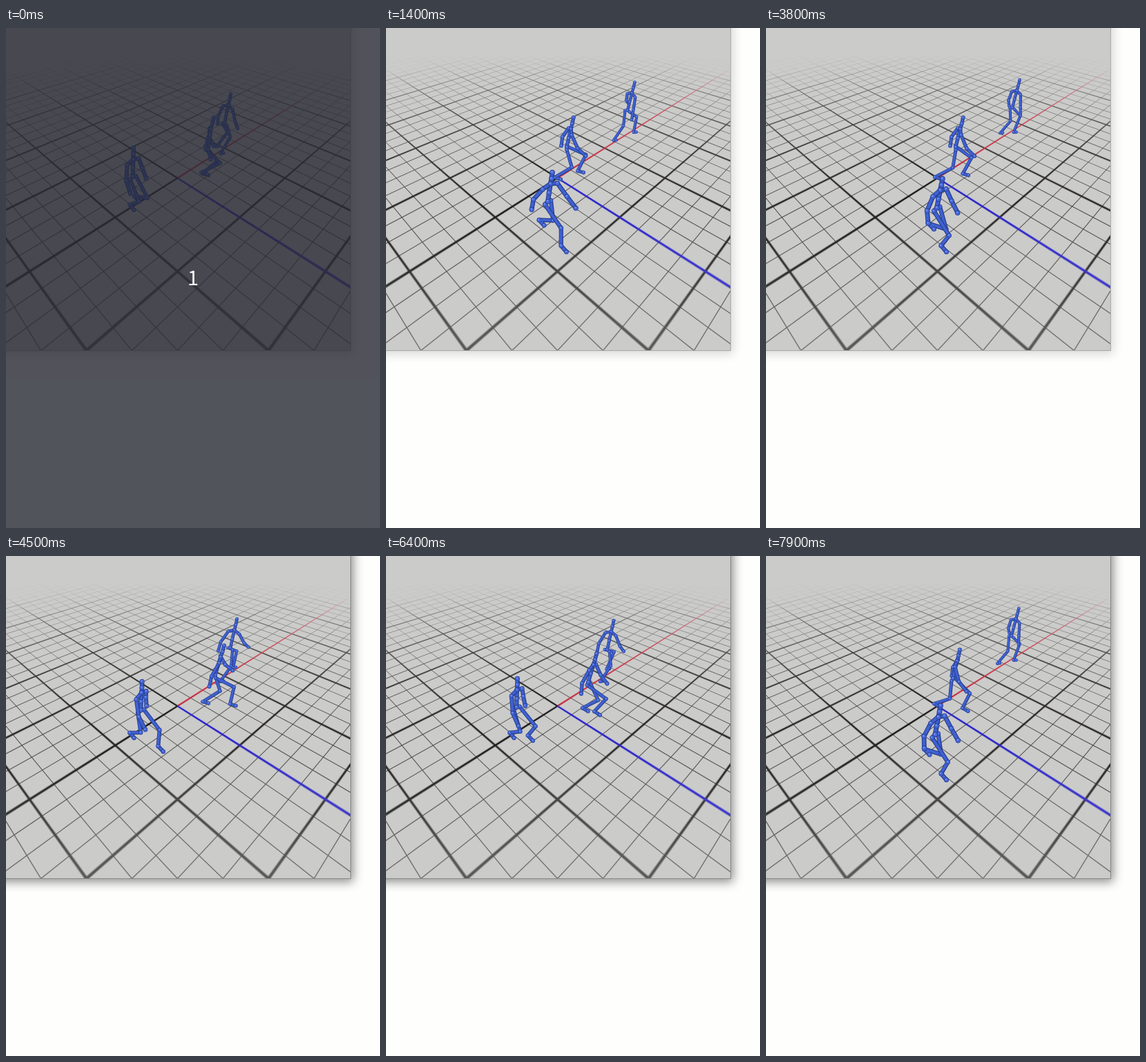
An HTML page with a canvas for the animation above (8 s loop, 542x723 px).

```html
<!DOCTYPE html>
<html lang="en">
<head>
<meta charset="utf-8">
<title>Walking skeletons</title>
<style>
  html, body { margin: 0; width: 100%; height: 100%; overflow: hidden; background: #fefefc; }
  #panel {
    position: absolute; left: -40px; top: -40px; box-sizing: border-box;
    width: 540px; height: 507px; border: 1px solid;
  }
  canvas { position: absolute; left: 39px; top: 39px; }
  #cover {
    position: absolute; inset: 0; display: grid; place-items: center;
    padding-bottom: 5px; background: rgba(39, 41, 51, .8); color: #fff;
    font: 29px/1 "Noto Sans CJK JP", "Noto Sans CJK SC", "DejaVu Sans", sans-serif;
  }
</style>
</head>
<body>
<div id="panel"><canvas id="view" width="499" height="466"></canvas></div>
<div id="cover">1</div>
<script>
const panel = document.getElementById('panel');
const view = document.getElementById('view');
const cover = document.getElementById('cover');
const ctx = view.getContext('2d');
const W = view.width, H = view.height, LOOP = 8000, TICK = 100;
const clamp = v => Math.max(0, Math.min(1, v));
const mix = (a, b, u) => a + (b - a) * u;

// r runs sideways, f towards the viewer, h up; one unit per heavy floor cell.
const CAM = { x: 248.5, y: 217, focal: 432, dist: 2.774, sin: .63, cos: .758 };
function project(r, f, h = 0) {
  const z = CAM.dist - f * CAM.cos - h * CAM.sin, scale = CAM.focal / z;
  return { x: CAM.x + r * scale, y: CAM.y + (f * CAM.sin - h * CAM.cos) * scale, z, scale };
}

const FAR = -4.3, NEAR = 3;
const HEAVY = { k: 9.85, c: 1.2 }, LIGHT = { k: 2.4, c: 0 };

// A floor line r = n + s * f, tapered with depth.
function floorLine(g, n, s, f0, f1, color, { k, c }, grow = 1) {
  const a = project(n + s * f0, f0), b = project(n + s * f1, f1);
  const len = Math.hypot(b.x - a.x, b.y - a.y);
  const nx = (a.y - b.y) / len, ny = (b.x - a.x) / len;
  const half = z => Math.max(.2, k / z - c) * grow / 2;
  const wa = half(a.z), wb = half(b.z);
  g.fillStyle = color;
  g.beginPath();
  g.moveTo(a.x + nx * wa, a.y + ny * wa);
  g.lineTo(b.x + nx * wb, b.y + ny * wb);
  g.lineTo(b.x - nx * wb, b.y - ny * wb);
  g.lineTo(a.x - nx * wa, a.y - ny * wa);
  g.fill();
}

// Heavy lines have soft edges.
function heavyLine(g, n, s, f0, f1, rgb) {
  floorLine(g, n, s, f0, f1, `rgba(${rgb},.35)`, HEAVY, 1.3);
  floorLine(g, n, s, f0, f1, `rgb(${rgb})`, HEAVY, .75);
}

// Lines fade with distance from the camera and soften close to it.
function fadeFloor(g) {
  const mask = document.createElement('canvas');
  mask.width = W; mask.height = H;
  const m = mask.getContext('2d');
  const horizon = CAM.y - CAM.focal * CAM.sin / CAM.cos;
  const drop = CAM.focal * CAM.dist * CAM.sin / CAM.cos ** 2;
  for (let x = 0; x < W; x++) {
    const side = Math.hypot(1, (x - CAM.x) * CAM.cos / CAM.focal);
    const grad = m.createLinearGradient(0, 0, 0, H);
    for (let i = 0; i <= 24; i++) {
      const d = side * drop / (i / 24 * H - horizon);
      const a = clamp(1 - (d / 7.2) ** 3) * mix(.62, 1, clamp((d - 2.3) / 1.1));
      grad.addColorStop(i / 24, `rgba(0,0,0,${a})`);
    }
    m.fillStyle = grad;
    m.fillRect(x, 0, 1, H);
  }
  g.globalCompositeOperation = 'destination-in';
  g.drawImage(mask, 0, 0);
}

function makeFloor() {
  const floor = document.createElement('canvas');
  floor.width = W; floor.height = H;
  const g = floor.getContext('2d');
  for (let n = -8; n <= 8; n += .25)
    if (n % 1) for (const s of [1, -1]) floorLine(g, n, s, FAR, NEAR, '#3c3a38', LIGHT);
  for (let n = -8; n <= 8; n++)
    if (n) for (const s of [1, -1]) heavyLine(g, n, s, FAR, NEAR, '16,14,13');
  heavyLine(g, 0, 1, FAR, 0, '0,0,0');
  heavyLine(g, 0, -1, 0, NEAR, '0,0,0');
  heavyLine(g, 0, -1, FAR, 0, '200,10,30');
  heavyLine(g, 0, 1, 0, NEAR, '16,8,200');
  fadeFloor(g);
  return floor;
}
const floor = makeFloor();

// Each walker repeats one short walk from its start, along its heading.
const RUN = 2080, STEP = 950, LANDING = 650, SUPPORT = 150, BONE = .195;
const walkers = [
  { r: .453, f: -.416, heading: () => -Math.PI / 4, stride: .297, shift: 250 },
  { r: .03, f: 0, heading: run => run > 2 ? .45 : 0, stride: .26, shift: 1180 },
  { r: -.335, f: .405, heading: () => Math.PI / 4, stride: .297, shift: 250 }
];

// Ankle of one foot: planted on every second footprint, swung in between.
function ankleAt(age, odd, stride) {
  const steps = (age - LANDING) / STEP + 1;
  const print = Math.floor((steps - odd) / 2) * 2 + odd;
  const leave = LANDING + print * STEP + SUPPORT;
  const u = clamp((age - leave) / (STEP - SUPPORT));
  const ease = u * u * (3 - 2 * u);
  return { s: (print + 2 * ease) * stride - .055, h: .03 + .06 * Math.sin(Math.PI * u) };
}

// Joints as [along, across, up], seen from the walker's start.
function skeleton(age, stride) {
  const s = -.07 + stride * .92 * age / 1000;
  const sway = Math.cos(Math.PI * (age - LANDING) / STEP);
  const hip = [s, 0, .35], neck = [s + .03, 0, .53];
  const arm = side => {
    const a = side * sway * .5, b = a + .35;
    const shoulder = [s + .025 + side * sway * .012, side * .055, .505];
    const elbow = [shoulder[0] + .12 * Math.sin(a), side * .09, shoulder[2] - .12 * Math.cos(a)];
    const hand = [elbow[0] + .1 * Math.sin(b), side * .1, elbow[2] - .1 * Math.cos(b)];
    return [neck, shoulder, elbow, hand];
  };
  const leg = (side, odd) => {
    const foot = ankleAt(age, odd, stride), top = [s, side * .028, .34];
    const ds = foot.s - s, dh = foot.h - top[2], reach = Math.hypot(ds, dh);
    const bend = Math.sqrt(Math.max(0, BONE ** 2 - reach ** 2 / 4)) / reach;
    const knee = [s + ds / 2 - dh * bend, side * .03, top[2] + dh / 2 + ds * bend];
    return [hip, top, knee, [foot.s, side * .028, foot.h],
      [foot.s + .055, side * .03, foot.h - .02]];
  };
  const spine = [[s + .048, 0, .635], [s + .04, 0, .58], neck, [s + .014, 0, .44], hip];
  return [arm(-1), leg(-1, 1), leg(1, 0), spine, arm(1)];
}

function stroke(chain, color, width, shift) {
  ctx.strokeStyle = color;
  ctx.lineWidth = width;
  ctx.beginPath();
  for (const p of chain) ctx.lineTo(p.x + shift, p.y + shift);
  ctx.stroke();
}

function dot(x, y, radius, color) {
  ctx.fillStyle = color;
  ctx.beginPath();
  ctx.arc(x, y, radius, 0, 7);
  ctx.fill();
}

function drawWalker(walker, t) {
  const clock = t + walker.shift, a = walker.heading(Math.floor(clock / RUN));
  const cos = Math.cos(a), sin = Math.sin(a);
  const place = ([s, side, h]) =>
    project(walker.r + s * cos - side * sin, walker.f + s * sin + side * cos, h);
  for (const bones of skeleton(clock % RUN, walker.stride)) {
    const chain = bones.map(place), w = chain[0].scale * .029;
    stroke(chain, '#263b85', w, 0);
    stroke(chain, '#3f61d2', w * .66, -.2);
    for (const { x, y } of chain) {
      dot(x, y, w * .56, '#2c4497');
      dot(x, y, w * .43, '#4467da');
      dot(x - .6, y - .8, w * .16, '#7f9bf2');
    }
  }
}

function draw(t) {
  ctx.fillStyle = '#cbcbca';
  ctx.fillRect(0, 0, W, H);
  ctx.drawImage(floor, 0, 0);
  ctx.lineCap = ctx.lineJoin = 'round';
  for (const walker of walkers) drawWalker(walker, t);

  const raised = clamp((t - 4000) / 300);
  const edge = mix(170, 136, raised);
  panel.style.boxShadow = `3px 4px 14px rgba(0,0,0,${mix(.16, .46, raised)})`;
  panel.style.borderColor = `rgb(${edge},${edge},${edge})`;
  cover.style.display = t < TICK ? '' : 'none';
}

const start = performance.now();
function tick(now) {
  const t = Math.max(0, now - start) % LOOP;
  draw(Math.floor(t / TICK) * TICK);
  requestAnimationFrame(tick);
}
draw(0);
requestAnimationFrame(tick);
</script>
</body>
</html>
```
